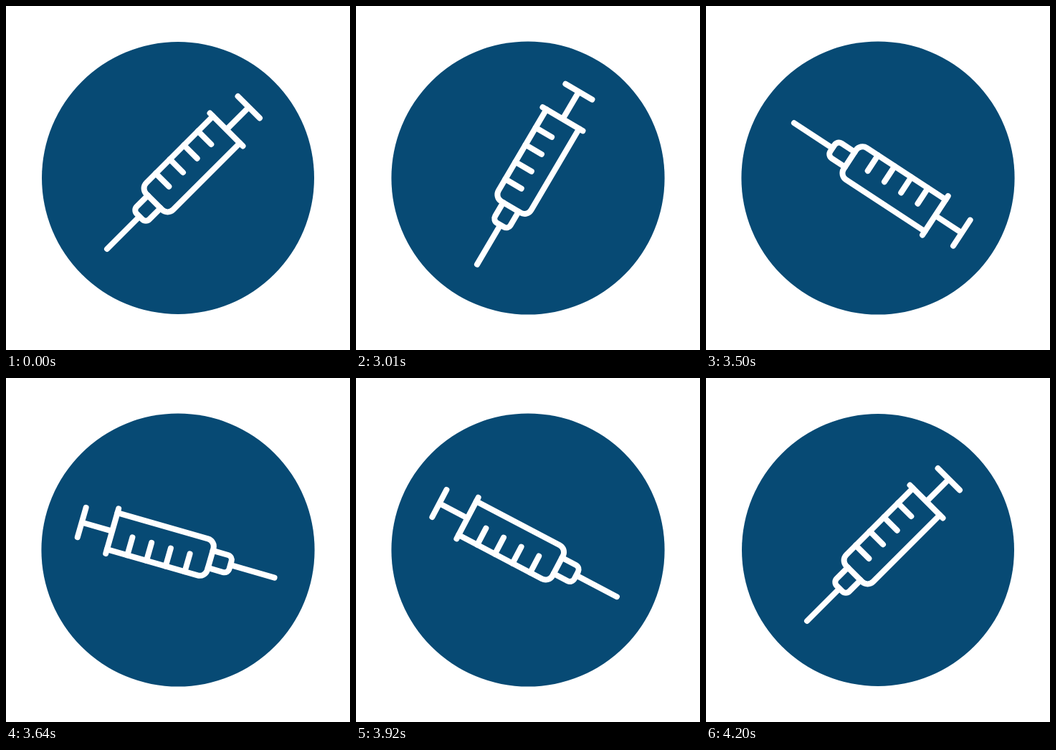
Write an HTML page that moves like this. It is 480 px wide and 480 px high and loops after 4.27 s.

```html
<!DOCTYPE html>
<html lang="en">
<head>
<meta charset="utf-8">
<title>Spinning syringe</title>
<style>
  html, body { margin: 0; height: 100%; overflow: hidden; background: #fff; }
  svg { display: block; width: 100vw; height: 100vh; }
  #syringe { fill: none; stroke: #fff; stroke-width: 8; stroke-linecap: round; stroke-linejoin: round; }
</style>
</head>
<body>
<svg viewBox="-240 -240 480 480">
  <circle id="disc" r="190" fill="#074a74"/>
  <g id="syringe">
    <path d="M-21.5-139.7h43M0-139.7v44M-32.5-95.5h65"/>
    <path d="M-26.5-95.5V36a11 11 0 0 0 11 11h31a11 11 0 0 0 11-11V-95.5"/>
    <path d="M-26.5-66h26m-26 27.8h26m-26 27.8h26m-26 27.8h26"/>
    <path d="M-12.5 47v22a7 7 0 0 0 7 7h11a7 7 0 0 0 7-7v-22M0 76v64"/>
  </g>
</svg>
<script>
  const LOOP = 4270, STEP = 70;
  const WINDUP_START = 2800, SPIN_START = 3220, SPIN_END = 4200;
  const REST = 45, WINDUP = -29, TURN = 720;
  const disc = document.getElementById("disc");
  const syringe = document.getElementById("syringe");

  // cubic-bezier(.5, 0, .5, 1)
  function ease(p) {
    let lo = 0, hi = 1;
    for (let i = 0; i < 24; i++) {
      const t = (lo + hi) / 2;
      if (1.5 * t * (1 - t) + t ** 3 < p) lo = t; else hi = t;
    }
    return lo * lo * (3 - 2 * lo);
  }

  function tween(time, start, end, from, to) {
    return from + (to - from) * ease((time - start) / (end - start));
  }

  function angleAt(time) {
    if (time <= WINDUP_START || time >= SPIN_END) return 0;
    return time < SPIN_START
      ? tween(time, WINDUP_START, SPIN_START, 0, WINDUP)
      : tween(time, SPIN_START, SPIN_END, WINDUP, TURN);
  }

  const begin = performance.now();
  function draw() {
    const elapsed = (performance.now() - begin) % LOOP;
    const angle = angleAt(Math.floor(elapsed / STEP) * STEP);
    syringe.setAttribute("transform", `rotate(${REST + angle})`);
    disc.setAttribute("r", angle ? 190.6 : 190);
    requestAnimationFrame(draw);
  }
  draw();
</script>
</body>
</html>
```
